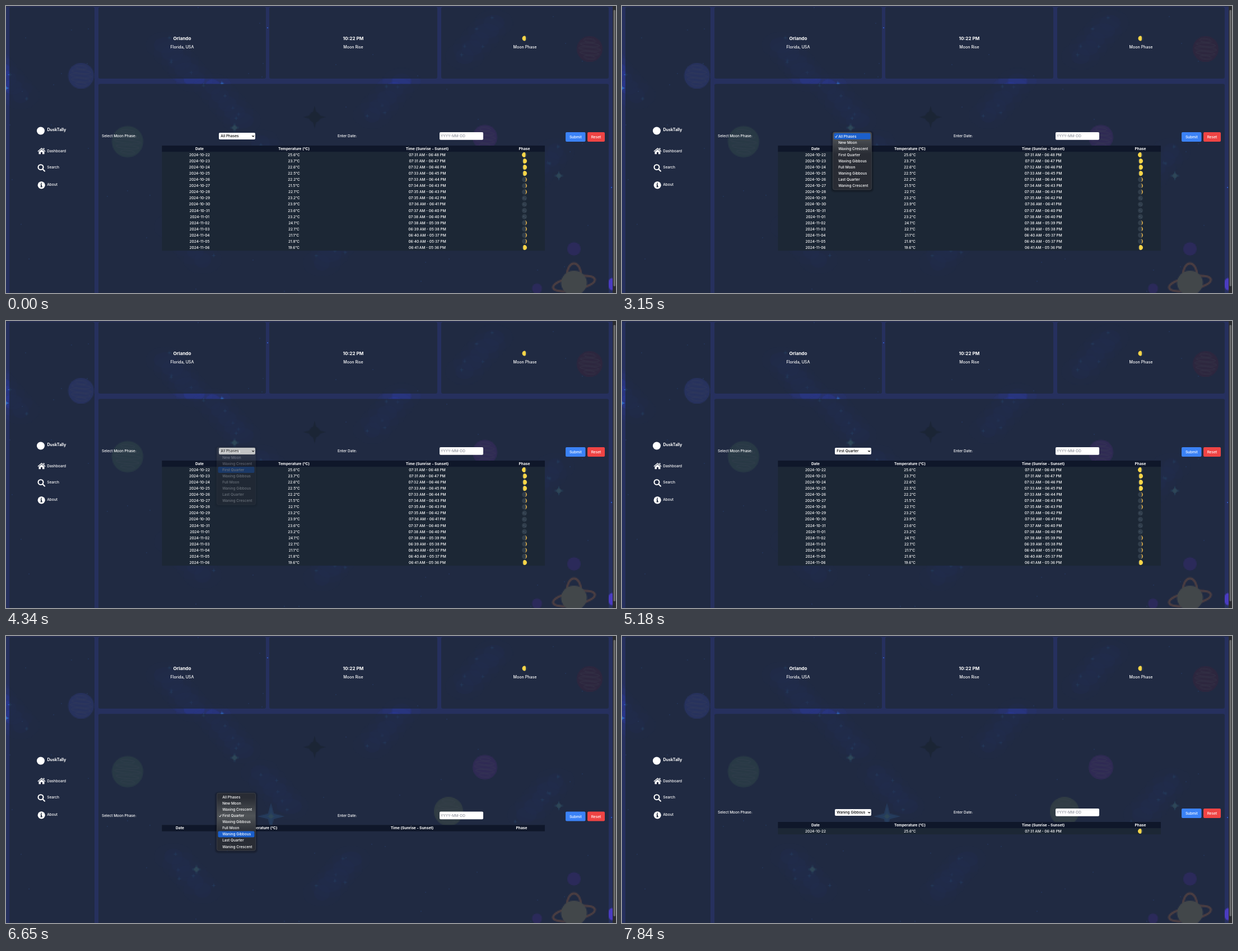
An HTML page with a canvas for the animation above (8000 ms loop, 1089 px wide and 514 px high).

```html
<!DOCTYPE html>
<html lang="en">
<head>
<meta charset="utf-8">
<title>Moon phase dashboard</title>
<style>
html, body { margin: 0; width: 100%; height: 100%; overflow: hidden; background: #26305e; }
canvas { position: absolute; left: 0; top: 0; width: 1090px; height: 514px; image-rendering: pixelated; }
svg { position: absolute; left: 0; top: 0; width: 1089px; height: 514px; }
text { font-family: Inter, "Liberation Sans", sans-serif; white-space: pre; }
</style>
</head>
<body>
<canvas id="sky" width="545" height="257"></canvas>
<svg viewBox="0 0 1089 514">
  <g id="base"></g>
  <g id="content"></g>
  <g id="menu"></g>
</svg>
<script>
const $ = id => document.getElementById(id);

// ---- Sky, drawn at half size for a pixel-art look ----
const c = $('sky').getContext('2d');
c.scale(.5, .5);
let seed = 7;
const rnd = () => (seed = seed * 16807 % 2147483647) / 2147483647;

function oval(x, y, rx, ry, turn, fill, line) {
  c.beginPath();
  c.ellipse(x, y, rx, ry, turn, 0, 7);
  c.fillStyle = c.strokeStyle = fill;
  c.lineWidth = line;
  line ? c.stroke() : c.fill();
}
function spark(x, y, r, color) {
  c.fillStyle = color;
  c.beginPath();
  for (let i = 0; i < 8; i++) {
    const d = i % 2 ? r * .3 : r, a = i * Math.PI / 4;
    c.lineTo(x + d * Math.cos(a), y + d * Math.sin(a));
  }
  c.fill();
}

// Each cloud is a slanted trail of puffs with a few sparks
const clouds = [[395, 175], [310, 100], [680, 165], [845, 60], [480, 275], [325, 425], [590, 430], [955, 290], [0, 130]];
for (const [x, y] of clouds) {
  const lean = x < 500 ? 1 : -1;
  for (let i = -2; i < 3; i++) {
    const px = x + i * 13 * lean, py = y + i * 15;
    oval(px, py, 34, 24, 0, 'rgba(42,56,150,.14)');
    oval(px, py, 14 + rnd() * 9, 14, 0, 'rgba(42,58,165,.32)');
    spark(px + 40 * (rnd() - .5), py + 30 * (rnd() - .5), 4, '#347cd8');
  }
}
for (let i = 0; i < 60; i++) {
  c.fillStyle = '#3158b8';
  c.fillRect(2 * Math.floor(rnd() * 544), 2 * Math.floor(rnd() * 257), 2, 2);
}

const planets = [
  [134, 125, 23, '#4a58e8'], [1042, 77, 23, '#68204c'], [217, 243, 28, '#507c70'],
  [855, 235, 22, '#7434b8'], [790, 314, 26, '#788c68']
];
for (const [x, y, r, color] of planets) {
  oval(x, y, r, r, 0, color);
  for (let i = -2; i < 3; i++)
    oval(x, y + i * r * .33, r * (.85 - i * i * .1), 3, .1, 'rgba(200,190,190,.28)', 1.5);
}
oval(1014, 435, 12, 12, 0, '#6030d8');
oval(948, 506, 9, 9, 0, '#6030d8');
oval(1082, 498, 7, 11, 0, '#4a3cc0');
oval(1014, 484, 13, 23, 0, '#ff9458', 4);
oval(1014, 497, 38, 12, -.2, '#ff9458', 4);
oval(1014, 496, 23, 22, 0, '#d4c288');
spark(551, 199, 20, '#101820');
oval(551, 199, 10, 10, 0, '#101820');
spark(473, 323, 24, '#3f86e0');
for (const [x, y] of [[473, 323], [408, 218], [340, 418], [987, 304]]) {
  spark(x, y, 9, '#48a8d8');
  oval(x, y, 4, 4, 0, '#70c0c8');
}

// ---- Interface ----
const rect = (x, y, w, h, fill, r = 0, extra = '') =>
  `<rect x="${x}" y="${y}" width="${w}" height="${h}" rx="${r}" fill="${fill}" ${extra}/>`;
// y is the middle of the capital letters
const text = (s, x, y, size = 6.5, fill = '#fff', anchor = 'start', weight = 500) =>
  `<text x="${x}" y="${y + size * .36}" font-size="${size}" fill="${fill}" text-anchor="${anchor}" font-weight="${weight}">${s}</text>`;
const mid = (s, x, y, size, weight) => text(s, x, y, size, '#fff', 'middle', weight);

// Lit shapes: waning gibbous, full side, thin crescent, dark
const lit = {
  l: ['M0-4.5A4.5 4.5 0 0 0 0 4.5A2 4.5 0 0 0 0-4.5', '#f8d548'],
  f: ['M0-4.5A4.5 4.5 0 0 1 0 4.5A2.4 4.5 0 0 1 0-4.5', '#f8d548'],
  t: ['M0-4.5A4.5 4.5 0 0 1 0 4.5A2.7 4.5 0 0 0 0-4.5', '#d8a948'],
  d: ['M-2-1h1.6v1.4h-1.6zM1 1h1.2v1.2h-1.2z', '#465a6c']
};
const moon = (kind, x, y) => `<g transform="translate(${x} ${y})"><circle r="4.5" fill="#303d4b"/>
  <path d="${lit[kind][0]}" fill="${lit[kind][1]}"/></g>`;

const panel = (x, y, w, h) => rect(x, y, w, h, 'rgba(30,41,59,.8)', 3);
const card = (x, w, title, label) => panel(x, 2, w, 128) +
  mid(title, x + w / 2, 58.3, 8.2, 700) + mid(label, x + w / 2, 73.5, 7.05);
$('base').innerHTML =
  panel(6, 2, 152, 520) + panel(165, 139.5, 911, 380) +
  card(165, 299, 'Orlando', 'Florida, USA') +
  card(470, 300, '10:22 PM', 'Moon Rise') +
  card(777, 299, '', 'Moon Phase') + moon('l', 926, 58) +
  rect(0, 0, 1089, 1, '#252a42') +
  rect(1083, 0, 6, 514, '#2b2c30') + rect(1084.5, 7, 3.5, 495, '#6a6b6d', 1.7) +
  '<circle cx="62" cy="223.5" r="7" fill="#fff"/>' +
  text('DuskTally', 73.5, 221.3, 7.1, '#fff', 'start', 700) +
  text('Dashboard', 73.2, 259.8) + text('Search', 73.2, 288.8) + text('About', 73.2, 319.6) +
  `<path d="M56.5 260L63.5 254L70.5 260L69.6 261L63.5 255.8L57.4 261ZM66.5 254.5h2v3l-2-1.7z
    M58.5 261L63.5 256.8L68.5 261V265.3H65V261.8H62V265.3H58.5Z" fill="#fff"/>
  <g fill="none" stroke="#fff" stroke-width="2.1" stroke-linecap="round">
    <circle cx="62" cy="288.7" r="4.5"/><path d="M65.5 292.2L69 295.7"/></g>
  <circle cx="63.2" cy="320.8" r="6.6" fill="#fff"/>
  <path d="M62.2 316.7h1.9v1.8h-1.9zM61.5 319.6h2.6v3.5h.8v1.3h-3.4v-1.3h.8v-2.2h-.8z" fill="#1e293b"/>`;

const phases = ['All Phases', 'New Moon', 'Waxing Crescent', 'First Quarter', 'Waxing Gibbous',
  'Full Moon', 'Waning Gibbous', 'Last Quarter', 'Waning Crescent'];
const titles = ['Date', 'Temperature (°C)', 'Time (Sunrise - Sunset)', 'Phase'];
const temps = '25.6 23.7 22.6 22.5 22.2 21.5 22.1 23.2 23.9 23.6 23.2 24.1 22.1 21.1 21.8 19.6'.split(' ');
const kinds = 'lffftttddddttttf';
// Sunrise gets later and sunset earlier; the clocks change near the end
const rows = temps.map((temp, i) => [
  new Date(Date.UTC(2024, 9, 22 + i)).toISOString().slice(0, 10),
  temp + '°C',
  `0${i < 12 ? 7 : 6}:${31 + Math.floor(.7 * i)} AM - 0${i < 11 ? 6 : 5}:${48 - Math.floor(.9 + .85 * i - .005 * i * i)} PM`
]);
const rowH = 11.07;
const shift = count => (rows.length - count) * rowH / 2;

// Filter bar and table, centred vertically for the number of rows
function content(count, value, focus) {
  const y = 233 + shift(count), top = y + 22.5;
  const cols = count ? [345.5, 514, 752, 925.5] : [310.5, 456.5, 725, 920.5];
  let s = text('Select Moon Phase:', 171, y) + text('Enter Date:', 592, y);
  if (focus) s += rect(379.5, y - 6.5, 66, 13, 'none', 2.5, 'stroke="#5b9cf0"');
  s += rect(380, y - 6, 65, 12, '#fff', 2) + text(phases[value], 383.3, y, 6.5, '#000') +
    `<path d="M439.3 ${y - .9}l1.9 1.9l1.9-1.9" fill="none" stroke="#000" stroke-width="1.1"/>` +
    rect(774, y - 7, 78, 13.7, '#fff', 2) + text('YYYY-MM-DD', 776, y, 6.45, '#808590', 'start', 400) +
    rect(999, y - 7, 35.5, 17, '#3b82f6', 2) + mid('Submit', 1016.8, y + 1.7) +
    rect(1038, y - 7, 31, 17, '#ef4444', 2) + mid('Reset', 1053.5, y + 1.7) +
    rect(278.5, top - 5.5, 683.5, (count + 1) * rowH, '#1c2735') +
    rect(278.5, top - 5.5, 683.5, rowH, '#0f172a');
  titles.forEach((title, i) => s += mid(title, cols[i], top, 6.65, 700));
  rows.slice(0, count).forEach((row, i) => {
    const ry = top + (i + 1) * rowH;
    row.forEach((cell, j) => s += mid(cell, cols[j], ry));
    s += moon(kinds[i], cols[3], ry);
  });
  return s;
}

// The menu glows where it lies over the white select box at height y
function menu(y, checked, hover, alpha) {
  const top = y - checked * rowH;
  let s = `<linearGradient id="glow" gradientUnits="userSpaceOnUse" x1="0" x2="0" y1="${y - 32}" y2="${y + 32}">
    <stop stop-color="#292c34"/><stop offset=".5" stop-color="#505458"/><stop offset="1" stop-color="#292c34"/></linearGradient>`;
  for (let d = 4; d > 0; d--) s += rect(376 - d, top - 6.5 - d, 70 + 2 * d, 103.5 + 2 * d, 'rgba(0,0,0,.08)', 3 + d);
  s += rect(376.5, top - 7.3, 69, 103, 'url(#glow)', 3, 'stroke="#4a4d55" stroke-width=".6"');
  phases.forEach((name, i) => {
    const iy = top + i * rowH;
    if (i === hover) s += rect(378.5, iy - 5.5, 65, 11, '#1b5fcb', 2);
    s += text(name, 386.2, iy);
    if (i === checked) s += `<path d="M380.6 ${iy + .4}l1.4 1.8l2.4-4.2" fill="none" stroke="#fff" stroke-width=".9"/>`;
  });
  return `<g opacity="${alpha}">${s}</g>`;
}

// Each visit: open, move down one item at a time, click, commit, leave the box
const visits = [
  { checked: 0, open: 3150, moves: [3570, 3640, 3780], click: 4130, commit: 4550, leave: 5180 },
  { checked: 3, open: 6370, moves: [6510, 6580, 6650], click: 6930, commit: 7280, leave: 7840 }
];

function put(id, html) {
  const el = $(id);
  if (el.last !== html) el.innerHTML = el.last = html;
}

function draw(t) {
  const count = t < 5320 ? 16 : t < 7840 ? 0 : 1;
  const value = 3 * visits.filter(v => t >= v.commit).length;
  const focus = visits.some(v => t >= v.commit && t < v.leave);
  put('content', content(count, value, focus));

  const v = visits.find(v => t >= v.open && t < v.click + 280);
  if (!v) return put('menu', '');
  // After the click the highlight blinks once, then the menu fades
  const step = Math.floor((t - v.click) / 70);
  const hover = step === 0 ? -1 : v.checked + v.moves.filter(m => t >= m).length;
  put('menu', menu(233.3 + shift(count), v.checked, hover, Math.min(1, (4 - step) / 3)));
}

const start = performance.now();
function tick() {
  draw((performance.now() - start) % 8000);
  requestAnimationFrame(tick);
}
tick();
</script>
</body>
</html>
```
